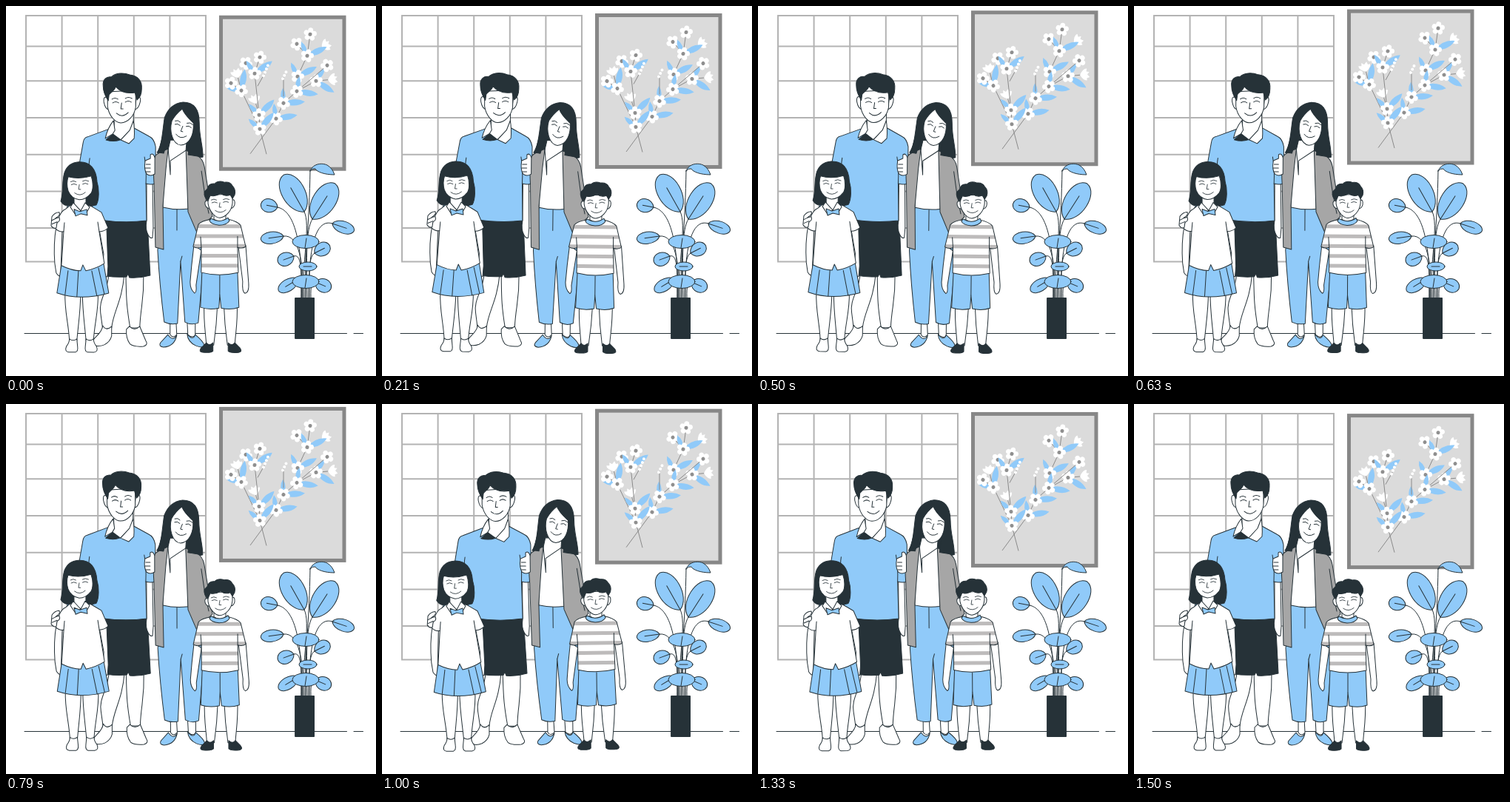
An HTML page for the animation above (1540 ms loop, 500 by 500 pixels).

```html
<!DOCTYPE html>
<html lang="en">
<head>
<meta charset="utf-8">
<title>Family portrait</title>
<style>
  html, body { margin: 0; width: 100%; height: 100%; overflow: hidden; background: #fff; }
  svg { display: block; width: 100vw; height: 100vh; }
  marker { overflow: visible; }
  .ink { stroke: #263238; stroke-width: 1; stroke-linecap: round; stroke-linejoin: round; fill: none; }
  .white { fill: #fff; }
  .blue { fill: #90caf9; }
  .grey { fill: #a6a6a6; }
  .dark { fill: #263238; }
  .bare { stroke: none; }
  .twig { fill: none; stroke: #8a8a8a; marker-mid: url(#leafy); marker-end: url(#open); }
  .twig.shy { marker-end: url(#side); }
  .spray { fill: none; stroke: #fff; stroke-width: 4; stroke-linecap: round; stroke-dasharray: 0 5; }
  .large { marker-end: url(#large); }
  .slim { marker-end: url(#slim); }
  .round { marker-end: url(#round); }
</style>
</head>
<body>
<svg viewBox="0 0 500 500">
  <defs id="markers"></defs>
  <defs>
    <path id="face" d="M-13 -8Q-9 -11 -5 -8M5 -9Q9 -12 14 -9M-12 -3Q-8 -6 -4 -3M5 -4Q9 -7 13 -4M0 -3L-1 5H2M-7 11Q1 18 9 10"/>
    <g id="girl-leg" class="white">
      <path d="M80 388C79 412 85 430 86 453H96C98 430 101 412 101 388Z"/>
      <path d="M86 450Q86 455 82 460Q79 467 85 468H94Q98 467 97 460L96 450Q91 454 86 450Z"/>
    </g>
    <g id="boy-leg">
      <path class="white" d="M268 402C267 428 270 440 271 458H281Q285 430 286 402Z"/>
      <path class="dark" d="M271 455Q275 460 280 455L280 466Q278 469 266 468Q260 467 264 462Z"/>
    </g>
  </defs>

  <path id="window" fill="none" stroke="#b3b3b3" stroke-width="2"/>
  <path class="ink" d="M25 442.5H460.500M470 442.5H482.500"/>

  <g id="picture">
    <rect x="290.5" y="15" width="166.5" height="205" fill="#dbdbdb" stroke="#878787" stroke-width="5"/>
    <path class="twig shy" d="M393 115L419 101L441 99"/>
    <path class="twig shy" d="M407 67L432 53"/>
    <path class="twig shy" d="M318 114L312 91"/>
    <path class="twig shy" d="M342 147L336 126"/>
    <path class="twig" d="M407 67L393 51"/>
    <path class="twig" d="M336 91L324 77"/>
    <path class="twig" d="M393 115L394 95L407 67L411 38"/>
    <path class="twig" d="M343 166L318 114L304 104"/>
    <path class="twig" d="M330 199.5L365 152L375 131L393 115L434 80"/>
    <path class="twig" d="M352 200L343 166L342 147L336 91L343 69"/>
    <path fill="none" stroke="#8a8a8a" d="M340 108L350 90M375 122V96"/>
    <path class="spray" d="M348 94L354 80"/>
    <path class="spray" d="M374 98L379 88"/>
  </g>

  <g id="plant" class="ink">
    <path class="large" d="M401 394C400 350 412 294 403 278"/>
    <path class="large" d="M407 394C406 340 405 302 414 288"/>
    <path class="round" d="M400 394C400 330 393 277 367 272"/>
    <path class="slim" d="M402 394C402 350 397 308 375 311"/>
    <path class="slim" d="M409 394C409 330 417 286 441 294"/>
    <path class="round" d="M399 394C399 360 400 334 389 338"/>
    <path class="round" d="M410 394C410 358 409 338 417 334"/>
    <path class="slim" d="M399 394Q400 366 395 369"/>
    <path class="round" d="M412 394Q411 370 418 373"/>
    <path d="M404 394C404 340 410 290 411 222M405 394V320"/>
    <path class="blue" d="M411 223C415 212 428 212 434 215Q441 219 444 228C430 228 420 224 418 220Q414 219 411 223Z"/>
    <g class="blue">
      <ellipse cx="405" cy="318.5" rx="18" ry="9"/>
      <ellipse cx="408" cy="352" rx="12" ry="6"/>
      <ellipse cx="405" cy="372.5" rx="18" ry="9"/>
    </g>
    <path d="M404 327L406 314M402 352H413M404 381L406 368"/>
    <rect class="dark" x="391" y="394.5" width="25.5" height="55"/>
  </g>

  <g id="family" class="ink">
    <g id="man">
      <path class="white" d="M139 362C138 385 125 397 128 415L131 437L143 435C145 413 157 400 160 362ZM162 362C163 390 162 400 168 435H181C182 405 187 400 186 362Z"/>
      <path class="white" d="M131 432C130 444 117 448 117 455C118 461 128 460 133 458Q141 454 143 446V433Q136 440 131 432ZM167 433L163 437Q162 449 168 457Q173 461 186 460Q193 458 189 452L181 433Q174 440 167 433Z"/>
      <path class="dark" d="M134 288H191L195 364Q181 368 167 367L165 362L163 366Q148 367 136 365Z"/>
      <path class="white" d="M190 238V290Q188 302 192 309Q195 315 198 313L199 300L198 238Z"/>
      <path class="blue" d="M137 167L110 177Q105 178 104 185L97 225L80 280L116 270L126 289Q160 294 190 290L189 240Q196 242 202 240L202 190Q200 179 193 176L173 165Z"/>
      <path d="M189 240Q190 220 187 204M113 206Q111 218 113 226"/>
      <path class="white" d="M146 148V165L144 173L155 181L168 168L172 158V145Z"/>
      <path class="dark" d="M135 181L144 173L154 181Q145 184 135 181Z"/>
      <path class="white" d="M145 155Q137 165 134 179L144 173L147 168ZM172 155Q174 168 173 179L166 186L155 181L167 168Z"/>
      <path class="white" d="M137 124Q131 121 132 130Q134 140 139 140ZM176 123Q183 121 181 130Q179 139 174 140Z"/>
      <path class="white" d="M137 116V136C139 149 148 158 155 158C164 158 173 149 175 137V114Z"/>
      <path class="dark" d="M138 128C134 122 131 116 131 108C130 99 136 95 142 96C148 90 159 90 167 93C178 94 184 102 183 112Q183 122 177 127Q175 122 174 117C162 119 153 115 148 109C147 114 141 117 139 120Z"/>
      <use href="#face" x="156" y="134"/>
    </g>

    <g id="woman">
      <path class="dark" d="M239 130C254 130 261 140 261 158C261 177 266 188 266 204Q256 207 246 202L217 198Q209 203 204 198C211 187 211 171 214 151Q221 132 239 130Z"/>
      <path class="white" d="M222 425V444Q226 450 231 444L230 425ZM245 425L246 444Q253 450 256 444V425Z"/>
      <path class="blue" d="M219 444L209 455Q206 460 213 461Q228 460 231 445Q226 454 219 444ZM245 443Q246 454 257 459Q267 463 268 458Q267 453 256 444Q253 453 245 443Z"/>
      <path class="blue" d="M212 271L246 274C262 305 266 330 266 360L260 428Q251 432 242 427L236 345L232 429Q222 431 214 427C210 395 207 365 205 330Z"/>
      <path d="M231 275V303M236 345L238 338"/>
      <path class="white" d="M222 181L219 194L212 205V272Q228 276 246 274L248 204L243 195L244 182Z"/>
      <path d="M219 193L222 228V209L243 195"/>
      <path class="grey" d="M219 193Q206 198 202 202Q198 210 200 240L202 326L213 329L212 270L216 220Z"/>
      <path class="grey" d="M243 195L258 202Q266 206 268 217L279 284Q272 292 263 294L258 306L246 278Z"/>
      <path d="M264 223L268 250L274 280"/>
      <path class="dark" d="M219 179L213 199L206 198L213 170ZM249 176L246 201L265 204L260 171Z"/>
      <path class="white" d="M224 155C228 148 234 142 238 139C241 147 249 154 253 158C254 172 249 187 236 188C225 187 220 169 224 155Z"/>
      <use href="#face" transform="translate(238 165) rotate(14) scale(.9)"/>
      <path class="white" d="M188 209L195 206V201Q199 198 201 205V227Q195 231 190 227Q186 221 188 209Z"/>
      <path d="M189 214H195M188 219H195M189 224H195"/>
    </g>

    <g id="girl">
      <use href="#girl-leg"/>
      <use href="#girl-leg" transform="translate(204.5 0) scale(-1 1)"/>
      <path class="white" d="M68 298C65 315 65 335 66 348L68 361Q72 367 74 364L76 303ZM126 302L132 335L131 357Q133 367 137 366L138 352L136 299Z"/>
      <path class="blue" d="M75 350L69 388Q101 399 139 388L132 348Z"/>
      <path d="M84 358L80 390M98 358L96 393M116 358L123 392M125 354L133 389"/>
      <path class="white" d="M91 266L80 275Q72 278 67 301Q72 306 78 305L75 351Q89 358 101 358L104 350L108 358Q122 355 133 348L126 305Q133 305 138 300L129 279Q121 274 107 266Z"/>
      <path d="M78 305L79 293M126 305L124 292"/>
      <path class="dark" d="M98 211C114 210 122 221 123 238C126 247 126 262 122 269Q113 272 105 268H92Q80 274 74 264C78 251 75 238 79 225Q84 212 98 211Z"/>
      <path class="white" d="M92 254V269L101 277L108 268V254Z"/>
      <path class="white" d="M91 266L87 272L93 281L101 277ZM107 266L113 272L108 281L101 277Z"/>
      <path class="blue" d="M92 275L100 278L109 275L110 283L101 281L94 284Z"/>
      <path class="white" d="M84 231Q99 235 115 230C118 238 118 248 115 253Q108 262 99 262Q88 260 84 250Q81 240 84 231Z"/>
      <use href="#face" transform="translate(99 244) scale(.9 .8)"/>
      <path class="white" d="M72 279Q66 279 62 285L61 297Q64 302 68 300L69 293Q74 291 72 286L67 287Q74 283 72 279Z"/>
      <path d="M62 290L68 287M62 295L69 292"/>
    </g>

    <g id="boy">
      <use href="#boy-leg"/>
      <use href="#boy-leg" transform="translate(580.5 0) scale(-1 1)"/>
      <path class="white" d="M254 323L251 350L249 373Q249 383 255 388Q258 387 257 377L264 330ZM314 324L320 372Q319 386 323 388Q329 387 328 374L324 323Z"/>
      <path class="blue" d="M265 358L263 407Q275 411 288 408L289 390L291 408Q304 411 315 407L313 358Z"/>
      <path d="M289 364V390"/>
      <clipPath id="shirt"><path id="shirt-shape" d="M277 288Q264 290 260 295L253 325Q258 328 264 326V360Q288 366 314 360L313 326Q319 328 324 325L317 296Q313 291 301 288Z"/></clipPath>
      <use href="#shirt-shape" class="white bare"/>
      <path clip-path="url(#shirt)" stroke="#bdbbbb" stroke-width="80" stroke-linecap="butt" stroke-dasharray="5 8.3" d="M289 295V360"/>
      <use href="#shirt-shape"/>
      <path d="M264 326L263 312M313 326V311"/>
      <path class="white" d="M281 278V288Q290 294 297 288V278Z"/>
      <path class="blue" d="M277 287Q289 294 300 286L302 290Q298 296 288 296Q277 295 275 290Z"/>
      <path class="white" d="M273 263Q268 262 269 268Q271 274 275 273ZM305 262Q310 260 309 268Q307 274 303 273Z"/>
      <path class="white" d="M273 255V267C275 278 283 286 289 286C297 285 305 277 306 266V254Z"/>
      <path class="dark" d="M273 263Q267 258 268 251L272 247Q274 239 282 240Q287 235 295 238Q303 237 306 243Q311 248 309 255L306 260L303 255Q296 258 290 253Q283 258 276 256Z"/>
      <use href="#face" transform="translate(289 268) scale(.9 .75)"/>
    </g>
  </g>
</svg>
<script>
const LOOP = 1540, LEAD = 35;
const byId = id => document.getElementById(id);
const repeat = (count, make) => Array.from({ length: count }, (_, i) => make(i)).join('');

byId('window').setAttribute('d', 'M27 13H270V345.5H27ZM27 54.5H270'
  + repeat(4, i => `M${27 + 48.6 * (i + 1)} 13V345.5`)
  + repeat(5, i => `M27 ${101.3 + 49.7 * i}H270`));

// Markers follow the direction of the stem they sit on
const marker = (id, shape) =>
  `<marker id="${id}" orient="auto" markerUnits="userSpaceOnUse">${shape}</marker>`;

const pottedLeaf = (id, length, width) => marker(id, `<g class="ink">
  <path class="blue" d="M0 0C${length * .15} ${-width * .67} ${length * .95} ${-width * .67} ${length} 0
    C${length * .95} ${width * .67} ${length * .15} ${width * .67} 0 0Z"/>
  <path d="M0 0H${length * .65}"/></g>`);

const flower = '<g class="white">'
  + repeat(5, i => `<ellipse cx="5" rx="4" ry="3.5" transform="rotate(${i * 72})"/>`)
  + '</g><circle r="2.5" fill="#8f8f8f"/>';
const sideFlower = '<path class="white" d="M-6 0Q-1 -9 4 -8L3 -4L7 -3L4 0L7 4L3 5L3 8Q-2 8 -6 0Z"/>';
const leafPair = '<path class="blue" d="M0 0Q16 6 19 22Q4 18 0 0ZM0 0Q4 -12 16 -13Q12 -2 0 0Z"/>';

byId('markers').innerHTML = pottedLeaf('large', 57, 31) + pottedLeaf('slim', 31, 16)
  + pottedLeaf('round', 23, 18) + marker('open', flower) + marker('side', sideFlower)
  + marker('leafy', leafPair + flower);

// Triangle wave: 0 at whole numbers, 1 at halves
const triangle = u => 1 - Math.abs(1 - 2 * (u - Math.floor(u)));

function draw() {
  const u = (performance.now() + LEAD) / LOOP;
  const lift = .7 - 10 * triangle(u);
  const sway = 2 * triangle(u + .25) - 1;
  byId('picture').setAttribute('transform', `translate(0 ${lift})`);
  byId('family').setAttribute('transform', `rotate(${sway} 195 281)`);
  requestAnimationFrame(draw);
}
draw();
</script>
</body>
</html>
```
